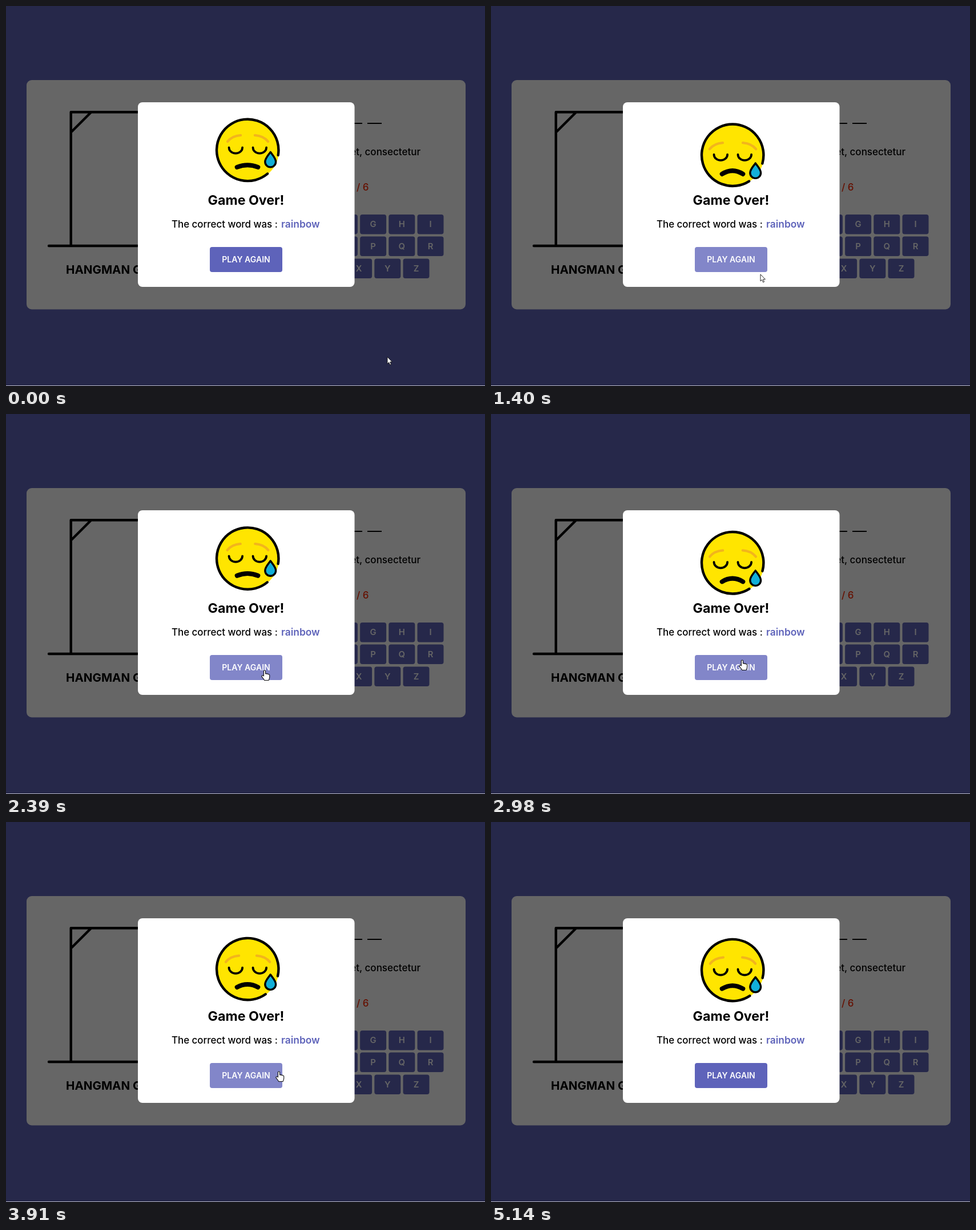
Recreate the animation shown at these times as an HTML page. Size 839 by 667 pixels, loop 5.16 s.

```html
<!DOCTYPE html>
<html lang="en">
<head>
<meta charset="utf-8">
<title>Hangman: game over</title>
<style>
  html, body { margin: 0; width: 100%; height: 100%; overflow: hidden; background: #26284a; }
  svg { display: block; width: 839px; height: 667px; font-family: Inter, "Open Sans", sans-serif; }
  .line { fill: none; stroke: #000; stroke-width: 4.4; stroke-linecap: round; stroke-linejoin: round; }
  .mid { text-anchor: middle; }
  .end { text-anchor: end; }
</style>
</head>
<body>
<svg viewBox="0 0 839 667">
  <rect width="839" height="667" fill="#26284a"/>
  <rect x="36" y="130" width="769" height="402.5" rx="9" fill="#666"/>
  <path d="M0 666.5H839" stroke="#b9bac8"/>

  <!-- gallows -->
  <path class="line" d="M75 421H300M113.7 421V186.3H300M148.5 187L115 220.5"/>
  <text x="105" y="470" font-size="20.6" font-weight="700">HANGMAN GAME</text>

  <!-- word, hint and keyboard -->
  <path d="M598.5 206H624M633 206H658" stroke="#000" stroke-width="2"/>
  <text class="end" x="726" y="262" font-size="17" font-weight="500">Lorem ipsum dolor sit amet, consectetur</text>
  <text class="end" x="635.5" y="324" font-size="17" font-weight="500" fill="#661000">6 / 6</text>
  <g id="keys" class="mid" font-size="14.8" font-weight="600"></g>

  <!-- dialog -->
  <rect x="231" y="169" width="379.5" height="324" rx="8" fill="#fff"/>
  <circle id="skin" cx="423.2" r="55" fill="#ffe500"/>
  <path id="rim" class="line"/>
  <g id="eyes" class="line" style="stroke-width:3.8">
    <path d="M390.5 248.5a11.8 10.3 0 0 0 23.6 0M432.5 248.5a11.8 10.3 0 0 0 23.6 0"/>
  </g>
  <path id="mouth" class="line" style="stroke-width:8"/>
  <g class="line" style="stroke:#f2b51c">
    <path id="browL" d="M388 238Q396 228 411 227"/>
    <path id="browR" d="M459 238Q451 228 436 227"/>
  </g>
  <path id="tear" class="line" style="stroke-width:3.4;fill:#12afd8"
        d="M463.2 256.5C467.5 262.5 472.6 267.5 472.6 273.6A9.4 9.4 0 0 1 453.8 273.6C453.8 267.5 459 262.5 463.2 256.5Z"/>
  <text class="mid" x="420.5" y="349" font-size="23.2" font-weight="700">Game Over!</text>
  <text x="290" y="389" font-size="16.9" font-weight="500">The correct word was :</text>
  <text x="482" y="389" font-size="17.4" font-weight="600" fill="#5e63ba">rainbow</text>
  <rect id="button" x="357" y="423" width="127" height="44" rx="4"/>
  <text class="mid" x="420.5" y="450" font-size="14.1" font-weight="600" fill="#fff">PLAY AGAIN</text>

  <!-- pointers, hotspot at 0,0 -->
  <g stroke="#111" stroke-linejoin="round" fill="#fff">
    <path id="arrow" stroke-width=".9" d="M0 0V12L2.7 9.5 4.6 14 6.6 13.1 4.7 8.8H8.4Z"/>
    <path id="hand" stroke-width="1.1" d="M-1.6 10V1.4Q-1.6 0 0 0T1.5 1.4V6Q3.2 5 4.2 6.4 6 5.5 6.6 7.1 8.5 6.4 8.7 8.6V12Q8.5 14.5 7 17.5H-.3Q-2 14.5-5 11.2-5.4 9.2-3.6 8.8-2.4 9-1.6 10Z"/>
  </g>
</svg>
<script>
const LOOP = 5160, GONE = 4850;
const $ = id => document.getElementById(id);
const set = (id, name, value) => $(id).setAttribute(name, value);
const move = (id, x, y) => set(id, "transform", `translate(${x} ${y})`);

// [time, x, y] stops of the pointer
const stops = [
  [0, 668, 616], [250, 480, 518], [400, 430, 455], [540, 428, 496],
  [700, 534, 554], [800, 534, 554], [950, 480, 490], [1090, 450, 450],
  [1250, 440, 445], [1400, 472, 471], [1550, 450, 450], [1700, 446, 446],
  [1950, 496, 474], [2150, 450, 455], [2390, 453, 450], [2460, 453, 450],
  [2690, 530, 484], [2980, 440, 432], [3240, 440, 440], [3500, 525, 468],
  [3700, 460, 445], [3910, 478, 438], [4010, 478, 438], [4150, 541, 470],
  [4320, 470, 450], [4450, 470, 450], [GONE, 757, 667]
];

function pointer(t) {
  t = Math.min(Math.max(t, 0), GONE);
  const i = Math.max(1, stops.findIndex(s => s[0] >= t));
  const [t0, x0, y0] = stops[i - 1], [t1, x1, y1] = stops[i];
  const p = (t - t0) / (t1 - t0), e = p * p * (3 - 2 * p);
  return [x0 + (x1 - x0) * e, y0 + (y1 - y0) * e];
}

const onButton = ([x, y]) => x > 357 && x < 484 && y > 423 && y < 467;

function drawKeys() {
  const rows = [["ABCDEFGHI", 318.9, 366], ["JKLMNOPQR", 318.9, 404.5], ["STUVWXYZ", 344.1, 443.5]];
  $("keys").innerHTML = rows.map(([letters, left, y]) => [...letters].map((c, i) => {
    const x = left + i * 50.2;
    return `<rect x="${x}" y="${y}" width="46" height="34.5" rx="4" fill="#26284a"/>
      <text x="${x + 23}" y="${y + 22.4}" fill="#666">${c}</text>`;
  }).join("")).join("");
}

function drawFace(t) {
  const cx = 423.2, r = 54.2;
  const cy = 258.3 - 5.4 * Math.cos(2 * Math.PI * (t + 40) / 2250);
  const k = (cy - 253) / 9;
  const onRim = deg => {
    const a = deg * Math.PI / 180;
    return `${cx + r * Math.cos(a)} ${cy + r * Math.sin(a)}`;
  };
  set("skin", "cy", cy);
  set("rim", "d", `M${onRim(50 + 8 * k)}A${r} ${r} 0 1 1 ${onRim(9.5 + 6.5 * k)}`);
  move("eyes", 0, 12.5 * k);
  set("mouth", "d", `M404.7 ${283 + 12.3 * k}Q423 ${275.5 + 8 * k} 441.3 ${283 + 12.3 * k}`);
  move("browL", -5.3 * k, 13.5 * k);
  move("browR", 5.3 * k, 13.5 * k);
  move("tear", 0, 20 * k);
}

function frame(now) {
  const t = now % LOOP, at = pointer(t), over = onButton(at);
  drawFace(t);
  // the button colour follows the pointer slightly late
  set("button", "fill", onButton(pointer(t - 60)) ? "#8286c9" : "#5e63ba");
  move("arrow", ...at);
  move("hand", ...at);
  $("arrow").style.display = over || t > GONE ? "none" : "";
  $("hand").style.display = over ? "" : "none";
  requestAnimationFrame(frame);
}

drawKeys();
const start = performance.now();
requestAnimationFrame(function first(now) { frame(Math.max(0, now - start)); });
</script>
</body>
</html>
```
